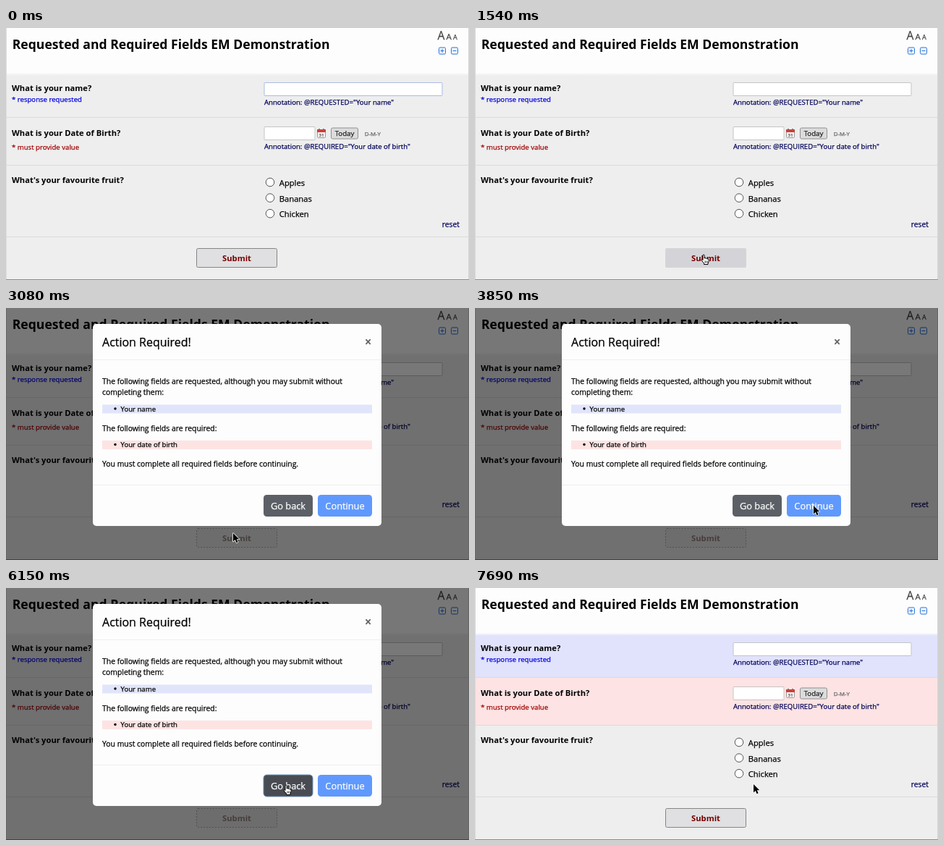
These frames come from a looping animation (640 px wide and 348 px high, 8 s). An HTML page with a canvas:

```html
<!DOCTYPE html>
<html lang="en">
<head>
<meta charset="utf-8">
<title>Form demonstration</title>
<style>
  html, body { margin: 0; width: 100%; height: 100%; overflow: hidden; background: #eee; }
  canvas { display: block; width: 640px; height: 348px; }
</style>
</head>
<body>
<canvas id="stage"></canvas>
<script>
const W = 640, H = 348, LOOP = 8000;
const canvas = document.getElementById('stage');
const dpr = window.devicePixelRatio || 1;
canvas.width = W * dpr;
canvas.height = H * dpr;
const ctx = canvas.getContext('2d');
ctx.scale(dpr, dpr);

// Each step holds until the next one starts.
const steps = [
  { at: 0, focus: true },
  { at: 770 },
  { at: 1540, hover: true, cursor: 'hand', x: 314, y: 313 },
  { at: 2310, hover: true, cursor: 'hand', x: 314, y: 313, ring: 24.5 },
  { at: 3080, modal: true, cursor: 'arrow', x: 314, y: 311 },
  { at: 3850, modal: true, cursor: 'arrow', x: 468, y: 273 },
  { at: 4620, modal: true, cursor: 'arrow', x: 468, y: 273, ring: 18 },
  { at: 5380, modal: true, cursor: 'arrow', x: 468, y: 273 },
  { at: 6150, modal: true, back: true, cursor: 'hand', x: 385, y: 272 },
  { at: 6920, modal: true, back: true, cursor: 'hand', x: 385, y: 272, ring: 20 },
  { at: 7690, marked: true, cursor: 'arrow', x: 385, y: 271 }
];

// A hairline stroke gives regular text slightly heavier stems.
function text(str, x, y, size, color = '#000', weight = 400, align = 'left') {
  ctx.font = `${weight} ${size}px "Open Sans", "Noto Sans", sans-serif`;
  ctx.textAlign = align;
  ctx.fillStyle = ctx.strokeStyle = color;
  ctx.lineWidth = .25;
  ctx.fillText(str, x, y);
  if (weight === 400) ctx.strokeText(str, x, y);
}

function rect(x, y, w, h, color) {
  ctx.fillStyle = color;
  ctx.fillRect(x, y, w, h);
}

function box(x, y, w, h, r, fill, stroke, width = 1) {
  ctx.beginPath();
  ctx.roundRect(x, y, w, h, r);
  if (fill) { ctx.fillStyle = fill; ctx.fill(); }
  if (stroke) { ctx.strokeStyle = stroke; ctx.lineWidth = width; ctx.stroke(); }
}

function circle(x, y, r, fill, stroke, width = 1) {
  ctx.beginPath();
  ctx.arc(x, y, r, 0, Math.PI * 2);
  if (fill) { ctx.fillStyle = fill; ctx.fill(); }
  if (stroke) { ctx.strokeStyle = stroke; ctx.lineWidth = width; ctx.stroke(); }
}

function drawHeader() {
  rect(0, 0, W, 62, '#fdfdfd');
  const fade = ctx.createLinearGradient(0, 61, 0, 66);
  fade.addColorStop(0, '#fdfdfd');
  fade.addColorStop(1, '#fdfdfd00');
  rect(0, 62, W, 4, fade);
  text('Requested and Required Fields EM Demonstration', 8.7, 29, 17.6, '#000', 700);
  text('A', 596.6, 16, 15.6, '#444');
  text('A', 608.4, 16, 11.6, '#444');
  text('A', 618, 16, 9.2, '#444');
  for (const x of [598, 615]) {
    box(x + .5, 27, 9, 9, 1.5, null, '#2270dd');
    rect(x + 2.5, 31, 5, 1, '#2270dd');
  }
  rect(602.5, 29, 1, 5, '#2270dd');
}

function drawCalendar(x, y) {
  box(x + .5, y + 1.5, 11, 11, 1, '#f4f4f6', '#999');
  rect(x, y + 1, 12, 4, '#cf3f35');
  rect(x + 2, y, 2, 2, '#777');
  rect(x + 8, y, 2, 2, '#777');
  text('31', x + 6, y + 11, 6, '#555', 700, 'center');
}

function drawSubmit({ hover, modal }) {
  if (hover) {
    box(263, 304, 112, 27, 2, '#d4d4d8');
  } else {
    if (modal) ctx.setLineDash([2, 2]);
    box(263.5, 304.5, 111, 26, 2, modal ? '#e9e9e9' : '#e0e0e2', modal ? '#aaa' : '#858585');
    ctx.setLineDash([]);
  }
  text('Submit', 319, 322, 11.2, modal ? '#977f7f' : '#780000', 700, 'center');
}

function drawForm(step) {
  rect(0, 0, W, H, '#eeeeee');
  if (step.marked) {
    rect(0, 64, W, 60, '#e1e2fc');
    rect(0, 124, W, 65, '#fde3e3');
  }
  drawHeader();
  for (const y of [123, 189, 288]) rect(0, y, W, 1, '#dadada');
  rect(0, 0, 1, H, '#dddddd');
  rect(639, 0, 1, H, '#d6d6d6');
  rect(0, 347, W, 1, '#8a8a92');

  text('What is your name?', 8, 87, 11.2, '#000', 700);
  text('* response requested', 8, 102, 9.6, '#0000e0');
  box(357, 75.5, 246, 18, 1, '#fff', step.focus ? '#a9bbe4' : '#c4c4c4');
  text('Annotation: @REQUESTED="Your name"', 357, 106, 9.6, '#000058');

  text('What is your Date of Birth?', 8, 149, 11.2, '#000', 700);
  text('* must provide value', 8, 168, 9.6, '#a00000');
  box(357, 136.5, 70, 18, 1, '#fff', '#c4c4c4');
  drawCalendar(430, 139);
  box(449.5, 138, 37, 15, 2, '#dcdcdc', '#909090');
  text('Today', 468, 149, 9.7, '#222', 400, 'center');
  text('D-M-Y', 495.7, 149, 7.8, '#666');
  text('Annotation: @REQUIRED="Your date of birth"', 357, 167, 9.6, '#000058');

  text("What's your favourite fruit?", 8, 214, 11.2, '#000', 700);
  ['Apples', 'Bananas', 'Chicken'].forEach((name, i) => {
    circle(365, 213 + i * 21.6, 5.8, '#fff', '#555');
    text(name, 377.8, 218 + i * 21.6, 11.2);
  });
  text('reset', 627, 275, 10.4, '#000058', 400, 'right');
  drawSubmit(step);
}

function listItem(label, y, color) {
  rect(133, y, 373, 12, color);
  circle(151, y + 5.5, 1.7, '#000');
  text(label, 158.5, y + 9, 9.6);
}

function drawModal({ back }) {
  rect(0, 0, W, H, 'rgba(0,0,0,.53)');
  box(120, 22, 399, 279, 5, '#fdfdfd');
  rect(120, 71, 399, 1, '#eeeeee');
  rect(120, 244, 399, 1, '#eeeeee');
  text('Action Required!', 133, 52.5, 16);
  text('×', 500.5, 53, 17, '#666', 700, 'center');

  text('The following fields are requested, although you may submit without', 133, 104.5, 10.4);
  text('completing them:', 133, 120, 10.4);
  listItem('Your name', 133.5, '#e1e5fc');
  text('The following fields are required:', 133, 169.5, 10.4);
  listItem('Your date of birth', 183, '#fee3e3');
  text('You must complete all required fields before continuing.', 133, 219, 10.4);

  box(356, 258, 68, 30, 4.5, back ? '#484c52' : '#5c6066', back ? '#6f93b8' : null);
  text('Go back', 390, 277.5, 12.8, '#fff', 400, 'center');
  box(431, 258, 75, 30, 4.5, '#6099fd');
  text('Continue', 468.5, 277.5, 12.8, '#fff', 400, 'center');
}

const arrow = new Path2D('M0 0V11.5L2.7 9L4.6 13.2L6.6 12.3L4.8 8.3H8.3Z');
const hand = new Path2D('M1 1.2Q1 0 2 0T3.2 1.2V5Q4.5 4.2 5.4 5.4Q6.7 4.7 7.5 6Q9 5.5 9.2 7.2V9.5L8 12V13.5H2.6V12L-.8 8Q-1.8 6.4 -.3 6.2L1 7.5Z');

function drawCursor({ cursor, x, y, ring }) {
  if (!cursor) return;
  if (ring) circle(x + .2, y, ring, null, '#111', 1.2);
  const isHand = cursor === 'hand';
  ctx.save();
  ctx.translate(x, y);
  ctx.lineJoin = 'round';
  ctx.lineWidth = isHand ? 1 : 1.4;
  ctx.strokeStyle = isHand ? '#000' : '#fff';
  ctx.fillStyle = isHand ? '#fff' : '#000';
  const shape = isHand ? hand : arrow;
  if (isHand) {
    ctx.fill(shape);
    ctx.stroke(shape);
    for (const dx of [3.6, 5.3, 7]) rect(dx, 8.5, .7, 3, '#000');
  } else {
    ctx.stroke(shape);
    ctx.fill(shape);
  }
  ctx.restore();
}

function draw(now) {
  const t = now % LOOP;
  const step = steps.findLast(s => s.at <= t);
  drawForm(step);
  if (step.modal) drawModal(step);
  drawCursor(step);
}

const start = performance.now();
function tick() {
  draw(performance.now() - start);
  requestAnimationFrame(tick);
}
tick();
</script>
</body>
</html>
```
